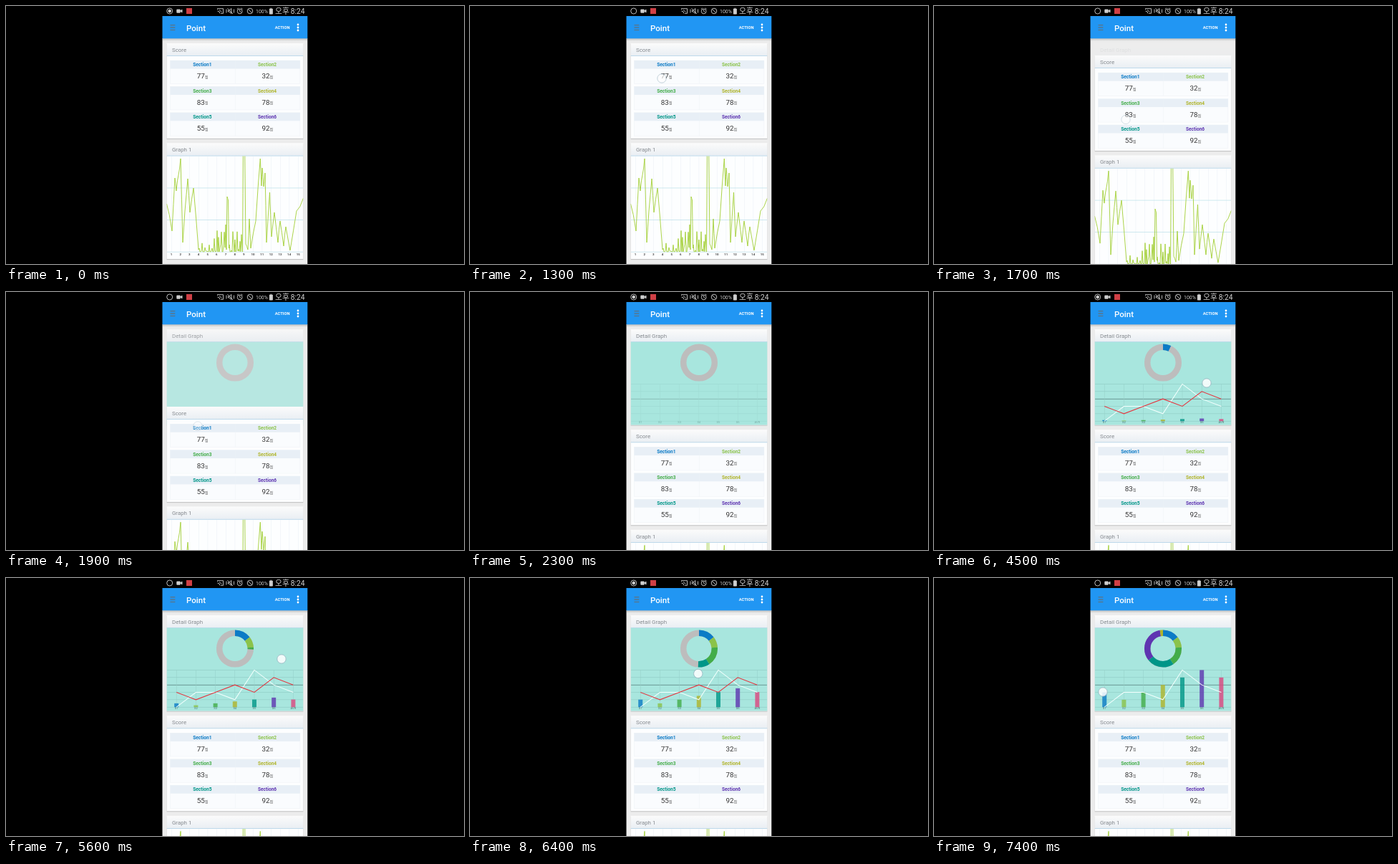
These frames come from a looping animation (640x360 px, 7.5 s). An HTML page:

```html
<!DOCTYPE html>
<html lang="ko">
<head>
<meta charset="utf-8">
<title>Point</title>
<style>
html, body { margin: 0; width: 100%; height: 100%; overflow: hidden; background: #000; }
svg { display: block; width: 640px; height: 360px; }
text { font-family: Roboto, "Noto Sans CJK KR", "Noto Sans CJK", sans-serif; }
.title { font-size: 7.9px; fill: #858a8f; }
.section { font-size: 6.6px; font-weight: 700; text-anchor: middle; }
.value { font-size: 9.9px; fill: #333; }
.unit { font-size: 4.6px; fill: #444; }
.tick { font-size: 4.4px; font-weight: 700; fill: #444; text-anchor: middle; }
.label { font-size: 4.2px; fill: #4d7773; text-anchor: middle; }
#status path, #status circle { fill: none; stroke: #cfcfcf; stroke-width: .9; }
#status .solid, #status text { fill: #cfcfcf; }
</style>
</head>
<body>
<svg viewBox="0 0 640 360">
  <defs>
    <linearGradient id="head" x2="0" y2="1">
      <stop offset="0" stop-color="#fbfbfb"/><stop offset="1" stop-color="#e9eef3"/>
    </linearGradient>
    <linearGradient id="shade" x2="0" y2="1">
      <stop offset="0" stop-color="#000" stop-opacity=".2"/><stop offset="1" stop-color="#000" stop-opacity="0"/>
    </linearGradient>
    <clipPath id="phone"><rect x="218.5" width="202.8" height="360"/></clipPath>
    <clipPath id="plot"><rect x="224.5" y="209.5" width="190.8" height="134"/></clipPath>
  </defs>
  <g clip-path="url(#phone)">
    <rect x="218" y="45" width="204" height="315" fill="#ececec"/>
    <g id="detail"></g>
    <g id="cards"></g>
    <rect x="218" y="45" width="204" height="4" fill="url(#shade)"/>
    <g id="bar"></g>
    <g id="status">
      <rect x="218" width="204" height="14"/>
      <circle cx="228.7" cy="7" r="4"/>
      <circle id="rec" class="solid" cx="228.7" cy="7" r="1.9"/>
      <path class="solid" d="M238.8 5H243.2V9.2H238.8ZM243.5 7L246 5V9Z"/>
      <rect x="252" y="3" width="8" height="8" fill="#cf3f45"/>
      <path d="M295.5 5V3.7H303.5V10.3H300M295.5 7A3.3 3.3 0 0 1 298.8 10.3M298 5.5L301.5 8.5"/>
      <path d="M308 4.5V9.5M318.5 4.5V9.5M310.5 6H312L315 3.5V10.5L312 8H310.5ZM309.5 3.2L317 11"/>
      <path d="M326.7 4.8V7.4L328.5 8.4M322.9 4.4L324.8 2.9M330.5 4.4L328.6 2.9"/>
      <circle cx="326.7" cy="7.4" r="3.4"/>
      <circle cx="341" cy="7" r="3.8"/>
      <path d="M338.3 4.3L343.7 9.7"/>
      <text x="349" y="9.8" font-size="7">100%</text>
      <path class="solid" d="M368.3 4H372.4V11.1H368.3ZM369.6 3.2H371"/>
      <text x="376" y="11" font-size="10.8">오후</text>
      <text x="397.7" y="10.8" font-size="10.3">8:24</text>
    </g>
    <circle id="touch" r="6.2" fill="#fff" stroke="#8fa9b8" stroke-width=".8"/>
  </g>
</svg>
<script>
const LOOP = 7500, STEP = 100;
const $ = id => document.getElementById(id);

function add(parent, tag, attrs, text) {
  const el = document.createElementNS('http://www.w3.org/2000/svg', tag);
  for (const k in attrs) el.setAttribute(k, attrs[k]);
  if (text !== undefined) el.textContent = text;
  parent.appendChild(el);
  return el;
}
const rect = (p, x, y, width, height, fill, more) => add(p, 'rect', { x, y, width, height, fill, ...more });
const label = (p, x, y, cls, s, more) => add(p, 'text', { x, y, class: cls, ...more }, s);
const clamp = v => Math.max(0, Math.min(1, v));
const mix = (a, b, f) => a + (b - a) * f;

const BLUE = '#0c7bc6', LIME = '#8bc34a', GREEN = '#43ad49', OLIVE = '#b0b52b';
const TEAL = '#009688', PURPLE = '#5e35b1', PINK = '#dc457f';
const TINTS = [BLUE, LIME, GREEN, OLIVE, TEAL, PURPLE];

function card(p, y, bottom, title, headEnd) {
  const h = bottom - y;
  rect(p, 224.4, y + .5, 191.2, h + .8, '#000', { opacity: .08 });
  rect(p, 224.8, y + 1, 190.4, h, '#000', { opacity: .1 });
  rect(p, 224.7, y, 190.6, h, '#fdfeff');
  rect(p, 224.7, y, 190.6, headEnd - y, 'url(#head)');
  rect(p, 224.7, headEnd - .5, 190.6, .7, '#a9cfe6');
  label(p, 232, headEnd - 5.9, 'title', title);
}

// Score card
const cards = $('cards');
card(cards, 52, 184.8, 'Score', 69.6);
[77, 32, 83, 78, 55, 92].forEach((score, i) => {
  const x = 229.5 + 90.7 * (i % 2), y = 76 + 36.4 * Math.floor(i / 2);
  rect(cards, x, y, 90.7, 32.5, '#fafcfe', { stroke: '#edf1f5', 'stroke-width': .5 });
  rect(cards, x, y, 90.7, 11.5, '#e8eff6');
  label(cards, x + 44.8, y + 8.3, 'section', 'Section' + (i + 1), { fill: TINTS[i] });
  label(cards, x + 37.2, y + 25.3, 'value', score);
  label(cards, x + 48.6, y + 25, 'unit', '점');
});

// Line graph card
card(cards, 191.5, 353, 'Graph 1', 209.2);
for (let i = 1; i <= 15; i++) {
  const x = 218.4 + 12.66 * i;
  rect(cards, x, 210, .5, 133, '#e8eff5');
  label(cards, x, 347.7, 'tick', i);
}
for (let i = 1; i <= 3; i++) rect(cards, 225, 209 + 44.6 * i, 190, .7, '#b9dfe8');

let seed = 11;
const rand = () => (seed = seed * 16807 % 2147483647) / 2147483647;
// Joins key points with a slightly rough line
function rough(keys) {
  const pts = keys.split(' ').map(k => k.split(',').map(Number));
  return pts.flatMap(([x, y], i) => {
    const [nx, ny] = pts[i + 1] || [x, y];
    const bump = nx - x < 2 ? 0 : 7 * (rand() - .5);
    return [[x, y], [mix(x, nx, .5), mix(y, ny, .5) + bump]];
  });
}
// Flat stretch with rare short spikes
function quiet(from, to) {
  return Array.from({ length: to - from }, (_, i) => [from + i, 343 - 38 * rand() ** 6]);
}
const trace = [
  ...rough('224.5,276 232,314 236,240 238,258 241,236 244,213 247,330 250,286 254,241 257,288 262,254 269,340'),
  ...quiet(270, 308),
  ...rough('308,340 309,266 310.5,271 311.5,338'),
  ...quiet(312, 330),
  ...rough('330.5,343 331.5,180 333.5,180 335,332 338,340 340,297 342,338 349,300 355.3,213 357,251 358,226 360,252 ' +
    '362,233 364,330 368.5,260 371,322 375,288 380,330 383,300 388,335 391,308 397,341 406,286 415.5,268')
];
add(cards, 'polyline', {
  points: trace.join(' '), fill: 'none', stroke: '#a3d036', 'stroke-width': .9,
  'stroke-linejoin': 'round', 'clip-path': 'url(#plot)'
});

// Detail card
const detail = $('detail');
const BASE = 180.2, UNIT = 10.35, COLS = 7;
const BARS = '2123454', RED = '2123243', WHITE = '0221532';
const colX = i => 238.2 + 27.2 * i;

card(detail, 52, 185.5, 'Detail Graph', 69.6);
rect(detail, 224.7, 69.8, 190.6, 115.7, '#a8e6de');
const grid = add(detail, 'g');
for (let i = 0; i < 6; i++) {
  const mid = i === 3;
  rect(grid, 225, BASE - UNIT * i - .3, 190, mid ? .9 : .6, mid ? '#64908c' : '#8ecac3');
}
for (let i = 0; i < COLS; i++) {
  rect(grid, colX(i) - .25, 128.4, .5, 52, '#94cfc8');
  label(grid, colX(i), 183.3, 'label', i < 6 ? 'S' + (i + 1) : 'AVR');
}
const bars = [...TINTS, PINK].map((c, i) => rect(detail, colX(i) - 3, BASE, 6, 0, c, { opacity: .8 }));

function line(levels, stroke) {
  const points = [...levels].map((v, i) => [colX(i), BASE - UNIT * v]).join(' ');
  return add(detail, 'polyline', { points, stroke, fill: 'none', 'stroke-width': 1.05, pathLength: 1 });
}
const whiteLine = line(WHITE, '#f2fffd');
const redLine = line(RED, '#e5353f');

// Ring, measured in degrees
const ring = stroke => add(detail, 'circle', {
  cx: 320, cy: 98.5, r: 21.8, fill: 'none', stroke, 'stroke-width': 8.5,
  pathLength: 360, transform: 'rotate(-90 320 98.5)'
});
ring('#bdbdbd');
const ENDS = [0, 52, 86, 146, 231, 350, 360];
const arcs = [BLUE, LIME, GREEN, TEAL, PURPLE, OLIVE].map(ring);

// App bar
const bar = $('bar');
rect(bar, 218, 14, 204, 31.3, '#2196f3');
for (let i = -1; i <= 1; i++) {
  rect(bar, 229.5, 29.3 + 3.4 * i, 6.8, 1.5, '#557791');
  add(bar, 'circle', { cx: 408, cy: 30 + 4 * i, r: 1.4, fill: '#fff' });
}
label(bar, 252, 34.6, '', 'Point', { 'font-size': 11.5, 'font-weight': 500, fill: '#fff' });
label(bar, 375.7, 32.3, '', 'ACTION', { 'font-size': 5.8, 'font-weight': 700, fill: '#fff' });

// Finger: a tap that slides down, then a drag over the chart
const DRAG = [[3300, 367, 159], [4500, 381, 127], [5600, 385, 113], [7400, 236, 159]];
function touchAt(t) {
  if (t < 3200) {
    const f = clamp((t - 1300) / 600);
    return [268, mix(101, 187, f), t < 1200 || t > 1950 ? 0 : mix(.65, .35, f)];
  }
  const n = Math.max(1, DRAG.findIndex(k => k[0] >= t));
  const [a, b] = [DRAG[n - 1], DRAG[n]];
  const f = clamp((t - a[0]) / (b[0] - a[0]));
  return [mix(a[1], b[1], f), mix(a[2], b[2], f), .85];
}

function drawLine(el, p) {
  el.setAttribute('stroke-dasharray', `${p} 2`);
  el.style.display = p > 0 ? '' : 'none';
}

function render(t) {
  const open = (1 - Math.cos(Math.PI * clamp((t - 1600) / 440))) / 2;
  cards.setAttribute('transform', `translate(0 ${140.4 * open})`);
  detail.setAttribute('opacity', open);
  grid.setAttribute('opacity', clamp((t - 2100) / 400));

  const drawn = clamp((t - 3400) / 1000);
  drawLine(whiteLine, drawn);
  drawLine(redLine, t < 6500 ? drawn : 0);

  const grow = t > 3300 ? clamp((t - 2450) / 4950) ** 3 : 0;
  bars.forEach((b, i) => {
    const h = BARS[i] * UNIT * grow;
    b.setAttribute('y', BASE - h);
    b.setAttribute('height', h);
  });
  arcs.forEach((a, i) => {
    const len = Math.min(ENDS[i + 1], 360 * grow) - ENDS[i];
    a.style.display = len > 0 ? '' : 'none';
    a.setAttribute('stroke-dasharray', `0 ${ENDS[i]} ${Math.max(0, len)} 360`);
  });

  const on = t < 1300 || Math.floor((t - 300) / 1000) % 2 === 0;
  $('rec').style.display = on ? '' : 'none';

  const [x, y, alpha] = touchAt(t);
  const touch = $('touch');
  touch.setAttribute('cx', x);
  touch.setAttribute('cy', y);
  touch.setAttribute('opacity', alpha);
}

const start = performance.now();
function tick() {
  const t = (performance.now() - start) % LOOP;
  render(Math.floor(t / STEP) * STEP);
  requestAnimationFrame(tick);
}
tick();
</script>
</body>
</html>
```
